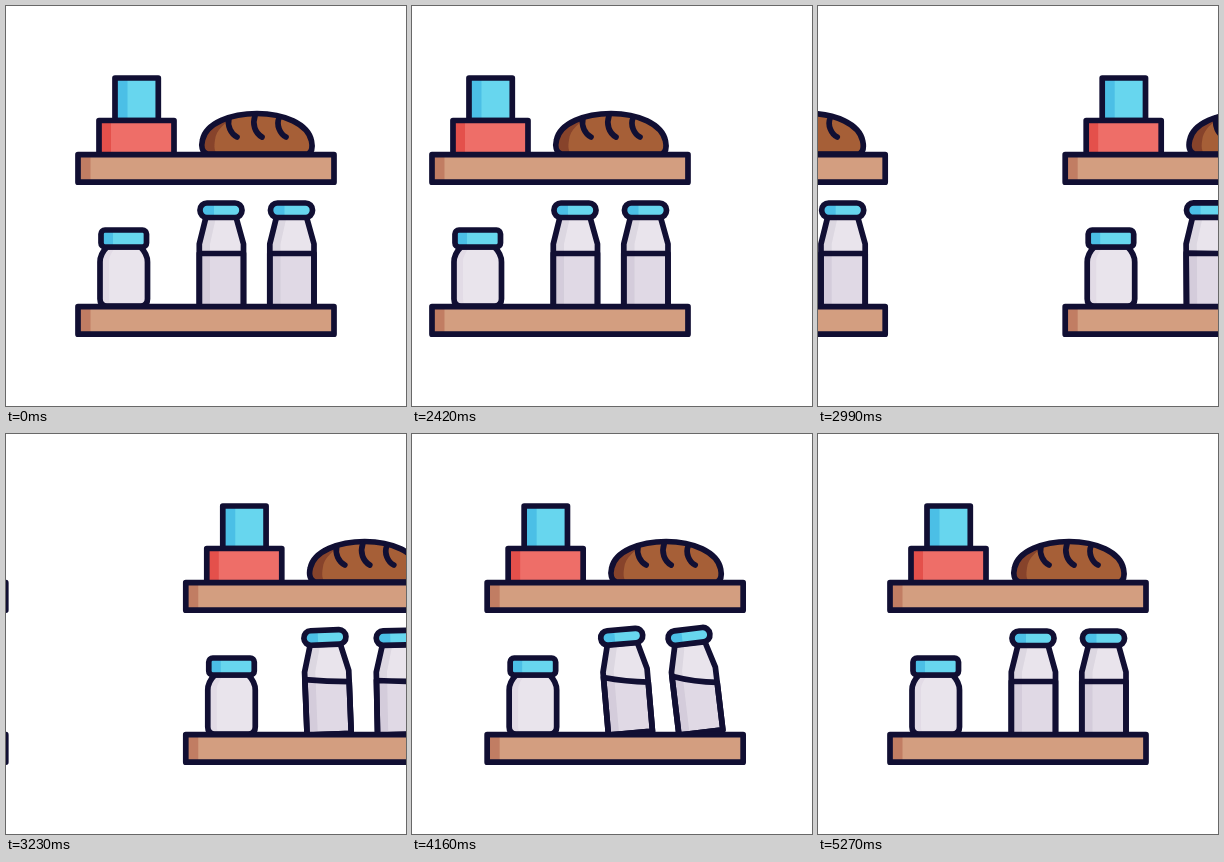
Recreate the animation shown at these times as an HTML page. Size 400 px wide and 400 px high, loop 5.36 s.

```html
<!DOCTYPE html>
<html lang="en">
<head>
<meta charset="utf-8">
<title>Pantry shelves</title>
<style>
  html, body { margin: 0; width: 100%; height: 100%; overflow: hidden; background: #fff; }
  svg { display: block; width: 100%; height: 100%; }
  .line, .milk { fill: none; stroke: #110f33; stroke-width: 5.7; stroke-linejoin: round; stroke-linecap: round; }
  .milk { fill: #e0d9e5; }
</style>
</head>
<body>
<svg viewBox="0 0 400 400">
  <defs>
    <g id="shelf">
      <path fill="#d39e80" d="M72 148.700H328V176.200H72z"/>
      <path fill="#c17d63" d="M72 148.700H84.500V176.200H72z"/>
      <path class="line" d="M72 148.700H328V176.200H72z"/>
    </g>
    <path id="glass" d="M200 211L193.300 238V301H237.500V238L230 211z"/>
    <g id="cap">
      <path fill="#110f33" opacity=".06" d="M200 211L193.300 238V301H204V238L210 211z"/>
      <use href="#glass" class="line"/>
      <rect fill="#67d6ee" x="194" y="197" width="42" height="14.500" rx="7"/>
      <path fill="#4bbfe6" d="M208 197H201a7 7 0 0 0 0 14.500H208z"/>
      <rect class="line" x="194" y="197" width="42" height="14.500" rx="7"/>
    </g>
    <path id="loaf" d="M201 148C196 146 195 140 196.500 134C200 117 225 107.500 251 107.500C278 107.500 302 118 305.500 135C307 142 306 146 302 148z"/>
    <path id="jar" d="M101 241C96 246 94 250 94 256V293Q94 300 101 300H134.500Q141.500 300 141.500 293V256C141.500 250 139.500 246 134.500 241z"/>
  </defs>

  <g id="unit">
    <path fill="#67d6ee" d="M109 72H152.300V114.500H109z"/>
    <path fill="#4bbfe6" d="M109 72H121.500V114.500H109z"/>
    <path class="line" d="M109 72H152.300V114.500H109z"/>
    <path fill="#ee6e68" d="M93 114.500H168V149H93z"/>
    <path fill="#e4504b" d="M93 114.500H105V149H93z"/>
    <path class="line" d="M93 114.500H168V149H93z"/>

    <use href="#loaf" fill="#a65f37"/>
    <path fill="#87432b" d="M201 148C196 146 195 140 196.500 134C199 120 215 112 232 109C219 116 210 124 209 134C208 140 208 146 212 148z"/>
    <use href="#loaf" class="line"/>
    <path class="line" d="M223 112C221 120 225 128 231 131M249 110C246 118 249 127 256 131M273 112C270 119 274 128 280 131"/>

    <use href="#jar" fill="#e9e4ec"/>
    <path fill="#e2dbe6" d="M101 241C96 246 94 250 94 256V293Q94 300 101 300H106Q103 298 103 293V256C103 250 106 246 110 241z"/>
    <use href="#jar" class="line"/>
    <rect fill="#67d6ee" x="95" y="224" width="45.500" height="17" rx="4"/>
    <path fill="#4bbfe6" d="M107 224H99a4 4 0 0 0-4 4v9a4 4 0 0 0 4 4H107z"/>
    <rect class="line" x="95" y="224" width="45.500" height="17" rx="4"/>

    <g class="bottle"><use href="#glass" fill="#e9e4ec"/><path class="milk"/><use href="#cap"/></g>
    <g class="bottle"><use href="#glass" fill="#e9e4ec"/><path class="milk"/><use href="#cap"/></g>
    <use href="#shelf"/>
    <use href="#shelf" y="152"/>
  </g>
  <use href="#unit" id="next"/>
</svg>
<script>
const LOOP = 5360, SPAN = 436, LEVEL = 247.5;
const unit = document.getElementById('unit'), next = document.getElementById('next');
const bottles = unit.querySelectorAll('.bottle');
const progress = (t, start, length) => Math.min(1, Math.max(0, (t - start) / length));
const smooth = p => p * p * (3 - 2 * p);

// cubic-bezier(1/3, 0, 0.3, 1), solved by bisection
function glide(p) {
  let lo = 0, hi = 1;
  for (let i = 0; i < 30; i++) {
    const s = (lo + hi) / 2, r = 1 - s;
    if (r * r * s + 0.9 * r * s * s + s * s * s < p) lo = s; else hi = s;
  }
  return smooth(hi);
}

// Bottles lean on their lower left corner while the shelf brakes
const lean = t => 7 * (smooth(progress(t, 2850, 1000)) - smooth(progress(t, 4000, 450)));

// The milk surface tips the other way and sags a little
function milk(angle) {
  const h = 0.84 * angle;
  return `M193.3 ${LEVEL - h}Q215.4 ${LEVEL + h / 2} 237.5 ${LEVEL + h}V301H193.3z`;
}

function draw(now) {
  const t = now % LOOP;
  const p = progress(t, 2000, 2400);
  const x = p === 0 || p === 1 ? 0 : -SPAN * glide(p);
  unit.setAttribute('transform', `translate(${x})`);
  next.setAttribute('transform', `translate(${SPAN})`);
  bottles.forEach((bottle, i) => {
    const angle = lean(t - 120 * i);
    bottle.setAttribute('transform', `translate(${70.5 * i}) rotate(${-angle} 193.3 301)`);
    bottle.querySelector('.milk').setAttribute('d', milk(angle));
  });
  requestAnimationFrame(draw);
}
requestAnimationFrame(draw);
</script>
</body>
</html>
```
